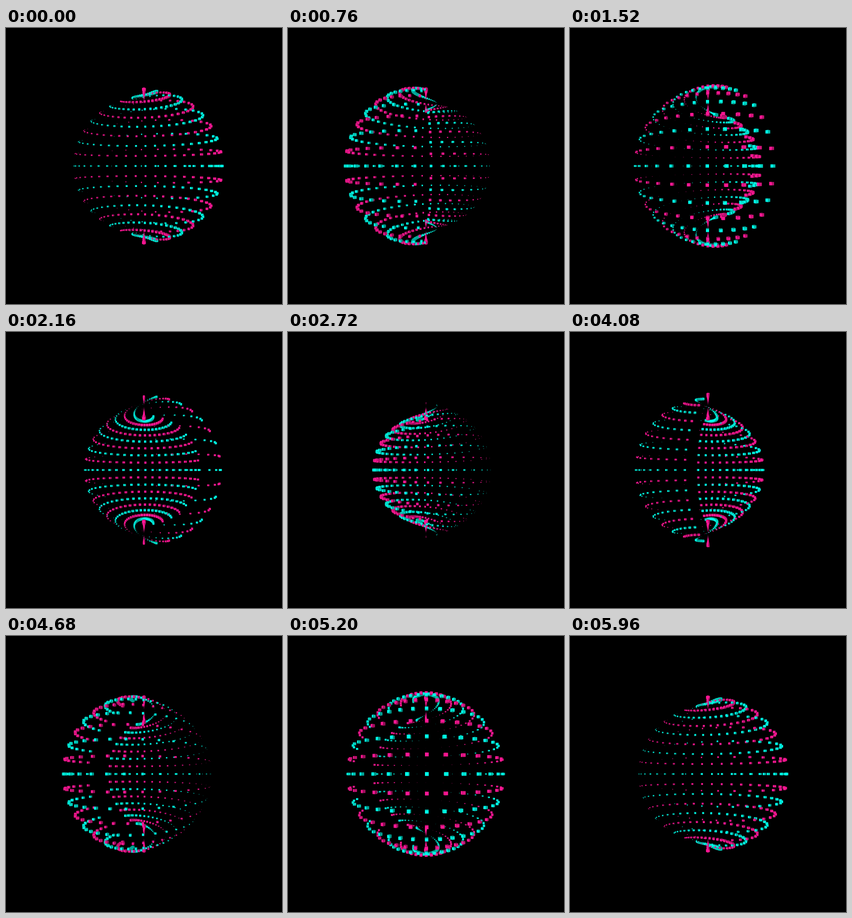
Recreate the animation shown at these times as an HTML page with a canvas. Size 540 by 540 pixels, loop 6000 ms.

```html
<!DOCTYPE html>
<html lang="en">
<head>
<meta charset="utf-8">
<title>Cube sphere</title>
<style>
  html, body { margin: 0; width: 100%; height: 100%; overflow: hidden; background: #000; }
  canvas { display: block; width: 540px; height: 540px; }
</style>
</head>
<body>
<canvas id="stage" width="540" height="540"></canvas>
<script>
const ctx = document.getElementById('stage').getContext('2d');

const LOOP = 6000, STEP = 40;
const CENTER = 270;
const CAMERA = CENTER / Math.tan(Math.PI / 6);
const ROWS = 18, COLS = 36;
const RADIUS = 125, SWING = 25, CUBE = 5;
const START = -51.57, PHASE = 2.4;
const PINK = [255, 24, 150], CYAN = [0, 255, 234];
const UP = [0, 1, 0];
const RAD = Math.PI / 180;
const LIGHT = [-Math.sin(35 * RAD), 0, Math.cos(35 * RAD)];

const dot = (a, b) => a[0] * b[0] + a[1] * b[1] + a[2] * b[2];
const scale = (a, k) => a.map(v => v * k);
const add = (a, b) => a.map((v, i) => v + b[i]);

function project([x, y, z]) {
  const k = CAMERA / (CAMERA - z);
  return [CENTER + x * k, CENTER - y * k];
}

function shade(color, normal) {
  const b = Math.min(1, 0.6 + 0.52 * Math.max(0, dot(normal, LIGHT)));
  return `rgb(${color.map(v => Math.round(v * b)).join(',')})`;
}

// Cubes stand upright, turned to their longitude; radius and size share one half-wave per turn.
function buildCubes(turn) {
  const cubes = [];
  for (let col = 0; col < COLS; col++) {
    const wave = Math.sin((turn + PHASE + col * 180 / (COLS - 1)) * RAD);
    const r = RADIUS + SWING * wave;
    const half = CUBE * Math.abs(wave) / 2;
    const lon = (START + turn - col * 360 / COLS) * RAD;
    const out = [Math.sin(lon), 0, Math.cos(lon)];
    const axes = [out, UP, [out[2], 0, -out[0]]];
    for (let row = 0; row <= ROWS; row++) {
      const lat = (90 - row * 180 / ROWS) * RAD;
      const pos = add(scale(out, r * Math.cos(lat)), scale(UP, r * Math.sin(lat)));
      const far = Math.hypot(pos[0], pos[1], CAMERA - pos[2]);
      cubes.push({ pos, half, far, axes, color: row % 2 ? CYAN : PINK });
    }
  }
  return cubes.sort((a, b) => b.far - a.far);
}

function drawCube({ pos, half, axes, color }) {
  axes.forEach((axis, i) => {
    const u = scale(axes[(i + 1) % 3], half);
    const v = scale(axes[(i + 2) % 3], half);
    for (const sign of [-1, 1]) {
      const normal = scale(axis, sign);
      const mid = add(pos, scale(normal, half));
      const toCamera = [-mid[0], -mid[1], CAMERA - mid[2]];
      if (dot(normal, toCamera) <= 0) continue;
      ctx.beginPath();
      for (const [a, b] of [[-1, -1], [1, -1], [1, 1], [-1, 1]]) {
        ctx.lineTo(...project(add(mid, add(scale(u, a), scale(v, b)))));
      }
      ctx.fillStyle = shade(color, normal);
      ctx.fill();
    }
  });
}

function render(time) {
  const t = Math.floor(time % LOOP / STEP) * STEP;
  ctx.fillStyle = '#000';
  ctx.fillRect(0, 0, 540, 540);
  buildCubes(t / LOOP * 360).forEach(drawCube);
}

function tick() {
  render(performance.now());
  requestAnimationFrame(tick);
}
tick();
</script>
</body>
</html>
```
